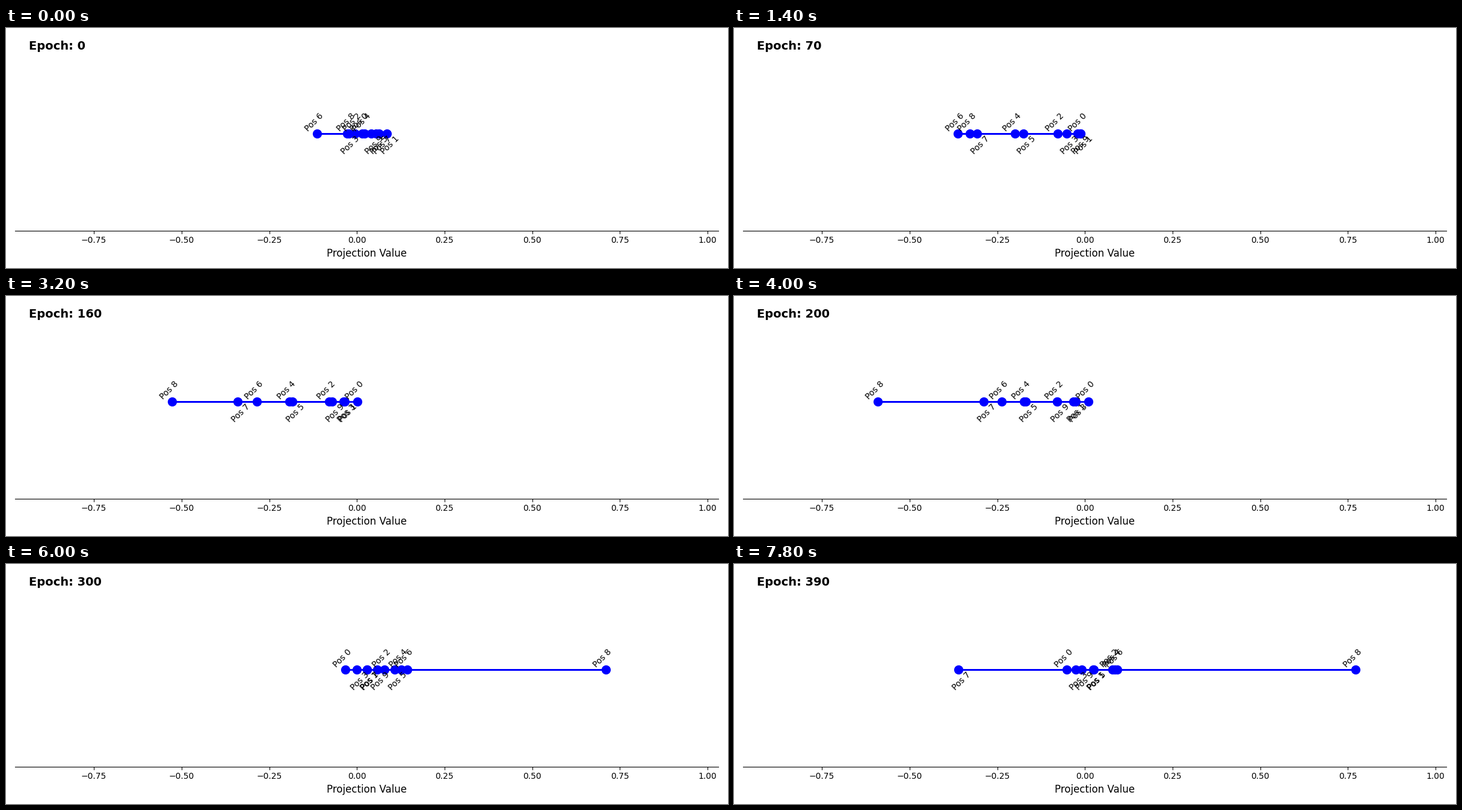
Recreate the animation shown at these times as a matplotlib script. Size 1200 px wide and 400 px high, loop 8 s.

```python
import numpy as np
import matplotlib.pyplot as plt
from matplotlib.animation import FuncAnimation

W, H, DPI = 1200, 400, 100
FRAMES, INTERVAL, STEP = 40, 200, 10
FAST, SETTLED, LAST = 40, 110, 390  # epochs that end each training phase
FLIP_EPOCH = 290                    # the projection axis changes sign here

# One path per position: value at epoch 0, FAST, SETTLED and LAST,
# then how far the last phase bows away from a straight line
PATHS = np.array([
    (.015, -.021, -.009, .052, 0),
    (.085, .037, -.037, -.024, 0),
    (-.006, -.073, -.079, -.078, 0),
    (-.028, -.050, -.052, .026, 0),
    (.022, -.169, -.215, -.085, 0),
    (.054, -.134, -.196, -.025, -.032),
    (-.114, -.378, -.354, -.092, .038),
    (.063, -.194, -.363, .361, -.181),
    (-.023, -.103, -.438, -.772, -.051),
    (.041, .032, -.047, .009, -.057),
])


def mix(a, b, s):
    return a + (b - a) * s


def project(epoch):
    start, fast, settled, last, bow = PATHS.T
    if epoch < FAST:
        v = mix(start, fast, epoch / FAST)
    elif epoch < SETTLED:
        s = (epoch - FAST) / (SETTLED - FAST)
        v = mix(fast, settled, 1 - (1 - s) ** 2)
    else:
        s = (epoch - SETTLED) / (LAST - SETTLED)
        v = mix(settled, last, s) + bow * 4 * s * (1 - s)
    return -v if epoch >= FLIP_EPOCH else v


plt.rcParams["font.family"] = "DejaVu Sans"
fig = plt.figure(figsize=(W / DPI, H / DPI), dpi=DPI, facecolor="white")
ax = fig.add_axes([15 / W, 62.3 / H, 1168.5 / W, 322.7 / H])
ax.set_xlim(-0.975, 1.030)
ax.set_ylim(-1, 1)
ax.set_xticks(np.arange(-0.75, 1.01, 0.25))
ax.set_yticks([])
ax.spines[["left", "right", "top"]].set_visible(False)
ax.set_xlabel("Projection Value", fontsize=12)

line, = ax.plot([], [], "o-", color="blue", linewidth=2, markersize=10)
title = ax.text(0.02, 0.953, "", transform=ax.transAxes, fontsize=14,
                fontweight="bold", va="center")


def make_label(i):
    up = i % 2 == 0
    return ax.annotate(f"Pos {i}", (0, 0), xytext=(0, 10 if up else -10),
                       textcoords="offset points", fontsize=10, rotation=45,
                       rotation_mode="anchor", ha="center",
                       va="bottom" if up else "top")


labels = [make_label(i) for i in range(len(PATHS))]


def update(frame):
    epoch = frame * STEP
    xs = project(epoch)
    line.set_data(xs, np.zeros_like(xs))
    for label, x in zip(labels, xs):
        label.xy = (x, 0)
    title.set_text(f"Epoch: {epoch}")
    return [line, title, *labels]


anim = FuncAnimation(fig, update, frames=FRAMES, interval=INTERVAL,
                     init_func=lambda: update(0), repeat=True, repeat_delay=0)
plt.show()
```
